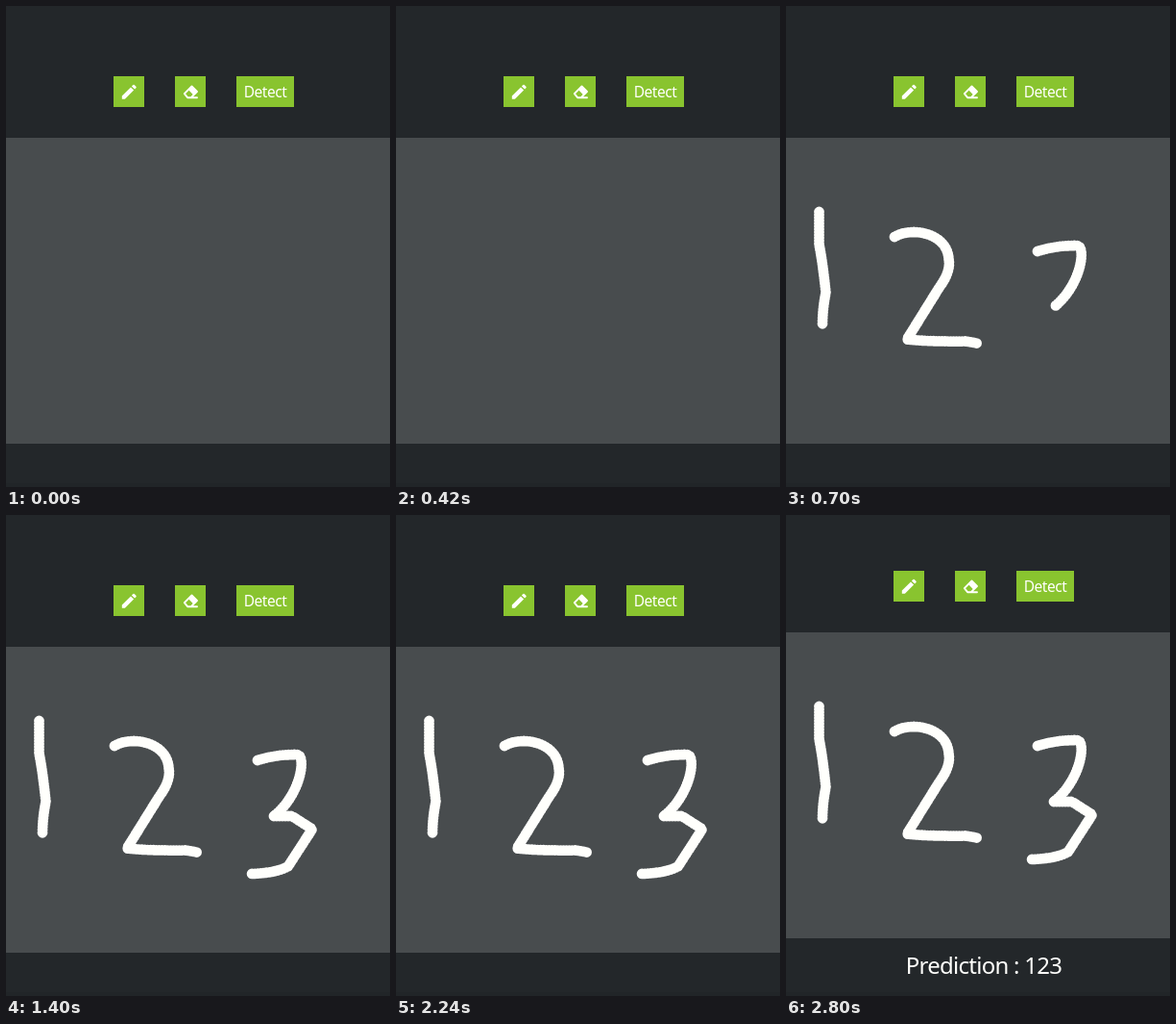
Write an HTML page with a canvas that moves like this. It is 400 px wide and 500 px high and loops after 3.5 s.

```html
<!DOCTYPE html>
<html lang="en">
<head>
<meta charset="utf-8">
<title>Digit detector</title>
<style>
  html, body { margin: 0; width: 100%; height: 100%; overflow: hidden; background: #23272a; }
  canvas { display: block; }
</style>
</head>
<body>
<canvas id="stage" width="400" height="500"></canvas>
<script>
const ctx = document.getElementById('stage').getContext('2d');
const LOOP = 3500;
const GREEN = '#89c42f', WHITE = '#fffffc';

// Handwriting, each stroke with the time it appears
const strokes = [
  [700, 'M34.5 214V248Q38 265 41.5 298Q38 315 38 332'],
  [700, 'M113 240C131 229 168 236 169.5 263Q172 276 160 292L126 346.5Q150 349 188 348.5L201 351'],
  [700, 'M262 255Q280 249 303 249C313 249 308 290 279 313'],
  [1400, 'M279 313H298L319 326.5L294 365Q283 372 255 373']
].map(([start, d]) => ({ start, path: new Path2D(d) }));

function rect(color, x, y, w, h) {
  ctx.fillStyle = color;
  ctx.fillRect(x, y, w, h);
}

function at(x, y, paint) {
  ctx.save();
  ctx.translate(x, y);
  ctx.fillStyle = ctx.strokeStyle = WHITE;
  ctx.lineCap = ctx.lineJoin = 'round';
  paint();
  ctx.restore();
}

function pen() {
  const r = 2.2;
  ctx.rotate(-Math.PI / 4);
  ctx.beginPath();
  ctx.moveTo(0, 0);
  ctx.lineTo(r, -r);
  ctx.lineTo(15.2, -r);
  ctx.lineTo(15.2, r);
  ctx.lineTo(r, r);
  ctx.roundRect(16.5, -r, 3, 2 * r, [0, 1, 1, 0]);
  ctx.fill();
}

function eraser() {
  ctx.lineWidth = 1.9;
  ctx.stroke(new Path2D('M14.2 13.2H4.3L1 9.1L8.7 1.5L14.2 7L8 13.2'));
  ctx.fill(new Path2D('M5.6 5.6L8.7 1.5L14.2 7L10.4 10.4z'));
}

function text(str, x, y, size) {
  ctx.font = size + 'px "Noto Sans", "Open Sans", sans-serif';
  ctx.letterSpacing = -0.03 * size + 'px';
  ctx.textAlign = 'center';
  ctx.fillStyle = WHITE;
  ctx.fillText(str, x, y);
}

function writing(t) {
  ctx.lineWidth = 10.8;
  ctx.setLineDash([0, 3]); // overlapping round dabs
  for (const s of strokes) if (t >= s.start) ctx.stroke(s.path);
}

function draw(t) {
  const detected = t >= 2800;
  rect('#23272a', 0, 0, 400, 500);
  rect('#212528', 0, 496, 400, 4);

  at(0, detected ? -15 : 0, () => {
    rect('#484c4e', 0, 137, 400, 318);
    rect(GREEN, 112, 73, 32, 32);
    rect(GREEN, 176, 73, 32, 32);
    rect(GREEN, 240, 73, 60, 32);
    at(120.8, 96.7, pen);
    at(184.8, 82, eraser);
    text('Detect', 270, 95, 15.5);
    writing(t);
  });

  if (detected) text('Prediction : 123', 206, 477, 24);
}

function tick() {
  draw(performance.now() % LOOP);
  requestAnimationFrame(tick);
}
tick();
</script>
</body>
</html>
```
